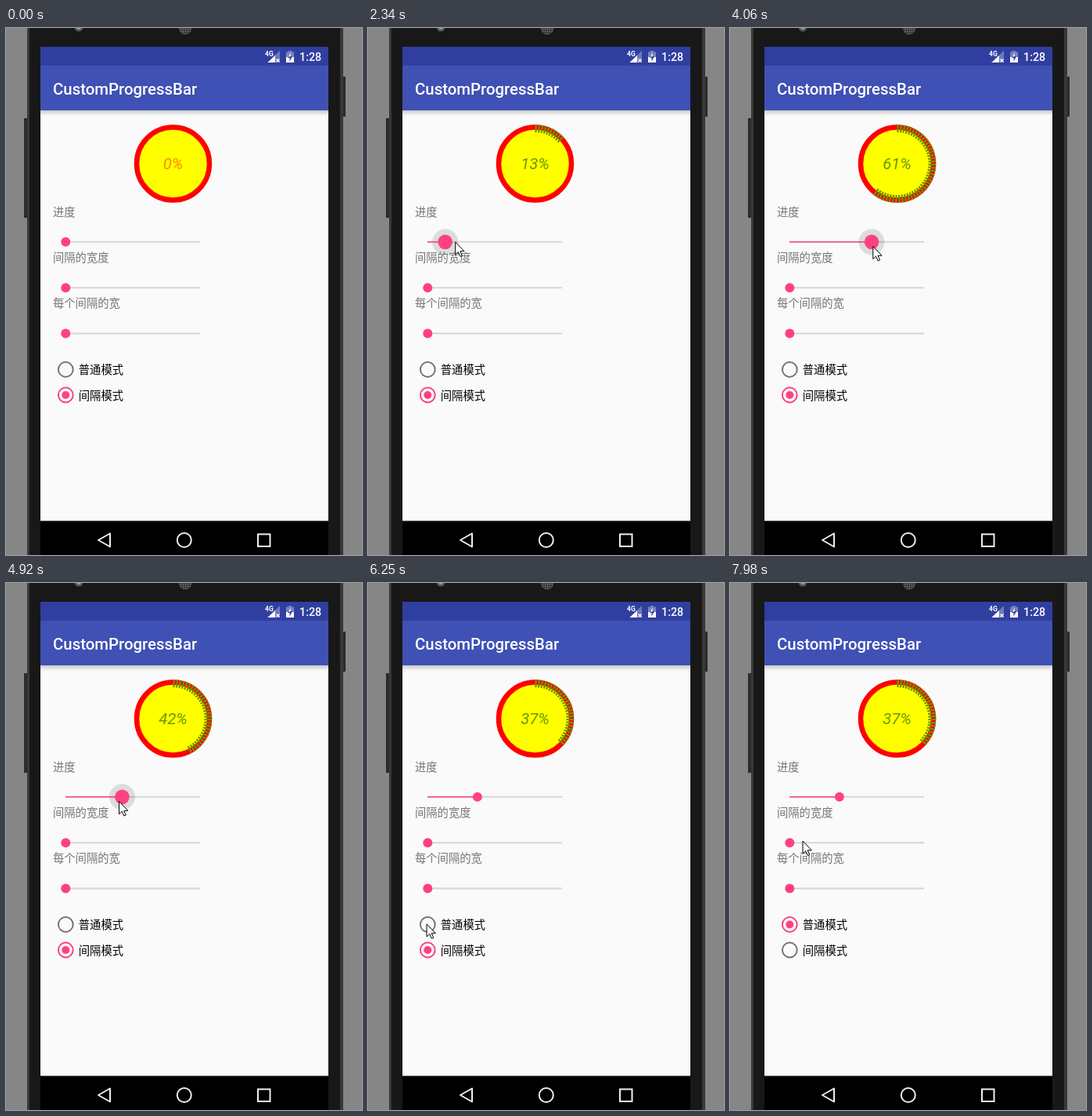
Animation of 455 by 672 pixels, one loop 8 s. Source, as an HTML page:

```html
<!DOCTYPE html>
<html lang="zh-CN">
<head>
<meta charset="utf-8">
<title>CustomProgressBar</title>
<style>
  html, body { margin: 0; width: 100%; height: 100%; overflow: hidden; background: #868686; }
  svg { display: block; width: 455px; height: 672px; }
  text { font-family: Roboto, "Noto Sans CJK SC", "Noto Sans CJK", sans-serif; font-size: 14.3px; }
  .title { font-size: 20.4px; font-weight: 500; fill: #fff; }
  .label { fill: #757575; }
  #percent { font-size: 20.4px; font-style: italic; text-anchor: middle; }
  .track { stroke: #d6d6d6; stroke-width: 2; }
  .pink { fill: #ff4081; }
  .nav { fill: none; stroke: #eee; stroke-width: 2; }
</style>
</head>
<body>
<svg viewBox="0 0 455 672">
  <defs>
    <linearGradient id="shade" x2="0" y2="1">
      <stop stop-color="#000" stop-opacity=".2"/>
      <stop offset="1" stop-color="#000" stop-opacity="0"/>
    </linearGradient>
    <pattern id="mesh" width="3" height="3" patternUnits="userSpaceOnUse">
      <rect width="3" height="3" fill="#333"/><circle cx="1.5" cy="1.5" r=".9" fill="#777"/>
    </pattern>
  </defs>

  <!-- phone body -->
  <rect width="455" height="672" fill="#868686"/>
  <rect x="23" y="115" width="5" height="127" fill="#2b2b2b"/>
  <rect x="429" y="62" width="5" height="51" fill="#2b2b2b"/>
  <rect x="27" width="404" height="672" fill="#383838"/>
  <rect x="30" width="397" height="672" fill="#181818"/>
  <circle cx="93" cy="-1" r="5.5" fill="#555"/>
  <circle cx="93" cy="-1" r="3" fill="#99a"/>
  <circle cx="229" cy="0" r="8.5" fill="url(#mesh)"/>

  <!-- screen -->
  <rect x="44" y="24" width="368" height="605" fill="#fafafa"/>
  <rect x="44" y="24" width="368" height="25" fill="#303f9f"/>
  <rect x="44" y="48" width="368" height="57" fill="#3f51b5"/>
  <rect x="44" y="105" width="368" height="7" fill="url(#shade)"/>
  <rect x="44" y="628.5" width="368" height="44"/>
  <text class="title" x="60" y="85">CustomProgressBar</text>

  <!-- status bar -->
  <g fill="#fff">
    <text x="331" y="35.5" style="font-size:8.5px;font-weight:700">4G</text>
    <path d="M334 44H350V29Z" opacity=".3"/>
    <path d="M334.5 44H344V35Z"/>
    <path d="M345.5 39.5l4 4m0-4l-4 4" stroke="#fff" stroke-width="1.2"/>
    <path d="M358 30.5h3V29h4v1.5h3V44H358Z" opacity=".35"/>
    <path d="M358 37H368V44H358Z"/>
    <path d="M363.7 31L360 38h2.5v4.5L366.2 36h-2.5Z" fill="#303f9f"/>
    <path d="M363.7 31L361 36.5h2.7Z"/>
    <text x="375" y="41.5" style="font-weight:500">1:28</text>
  </g>

  <!-- navigation bar -->
  <path class="nav" d="M118 653L133 644.5V661.5Z" stroke-linejoin="round"/>
  <circle class="nav" cx="227.8" cy="653" r="9"/>
  <rect class="nav" x="322" y="645.5" width="15.5" height="15.5"/>

  <!-- progress dial -->
  <circle cx="213.5" cy="173" r="46.5" fill="#ff0" stroke="#f00" stroke-width="6.5"/>
  <path id="ticks" fill="none" stroke="#690" stroke-width="10"/>
  <text id="percent" x="213.5" y="180"></text>

  <g class="label">
    <text x="60" y="239.5">进度</text>
    <text x="60" y="297.5">间隔的宽度</text>
    <text x="60" y="355.8">每个间隔的宽</text>
  </g>
  <g class="track"><path d="M76 272.8H248"/><path d="M76 331.2H248"/><path d="M76 389.5H248"/></g>
  <circle id="halo" cy="272.8" fill-opacity=".12"/>
  <path id="done" stroke="#ff4081" stroke-width="1.5"/>
  <g class="pink">
    <circle id="thumb" cy="272.8"/>
    <circle cx="76.3" cy="331.2" r="6"/>
    <circle cx="76.3" cy="389.5" r="6"/>
  </g>

  <g id="radios"></g>
  <text x="92.8" y="441">普通模式</text>
  <text x="92.8" y="473.5">间隔模式</text>

  <path id="cursor" d="M0 0V16.2L3.7 12.7L6.3 18.5L8.7 17.5L6.2 11.8H11.3Z" fill="#fff" stroke="#000" stroke-linejoin="round"/>
</svg>
<script>
const LOOP = 8000, STEP = 78;
const GRAB = 1740, PEAK = 4220, TURN = 4300, RELEASE = 5160, SWITCH = 7270;

const $ = id => document.getElementById(id);
const set = (el, attrs) => { for (const k in attrs) el.setAttribute(k, attrs[k]); };
const ramp = (t, from, to) => Math.min(1, Math.max(0, (t - from) / (to - from)));
const ease = u => (1 - Math.cos(Math.PI * u)) / 2;
const mix = (a, b, u) => a + (b - a) * u;

// The drag rises almost steadily, then eases back
function percentAt(t) {
  const u = ramp(t, GRAB, PEAK);
  return Math.round(64 * mix(u, ease(u), .3) - 27 * ease(ramp(t, TURN, RELEASE)));
}
const thumbX = percent => 76.3 + 1.717 * percent;

function dragPoint(t) {
  const lead = mix(17, -5.5, ramp(t, GRAB, RELEASE));
  return {
    x: thumbX(percentAt(t)) + mix(3, lead, ramp(t, GRAB, 2300)),
    y: 272 + 6.5 * ease(ramp(t, GRAB, PEAK))
  };
}

function pointerAt(t) {
  let p = { x: 350, y: 660 };
  const glide = (from, to, x, y, curve = ease) => {
    const u = curve(ramp(t, from, to));
    p = { x: mix(p.x, x, u), y: mix(p.y, y, u) };
  };
  glide(78, 720, 88, 264, u => 1 - (1 - u) ** 2);
  glide(870, 1400, 79, 272);
  if (t >= GRAB) p = dragPoint(Math.min(t, RELEASE));
  glide(RELEASE, 5940, 92, 384);
  glide(5940, 6250, 75, 435);
  glide(SWITCH + 130, 7940, 93, 329);
  return p;
}

function addRadio(y) {
  const make = attrs => {
    const c = document.createElementNS("http://www.w3.org/2000/svg", "circle");
    set(c, { cx: 76.3, cy: y, ...attrs });
    return $("radios").appendChild(c);
  };
  return { ring: make({ r: 9.4, fill: "none", "stroke-width": 2 }), dot: make({ class: "pink" }) };
}
const normal = addRadio(435.5), spaced = addRadio(468);

function setRadio({ ring, dot }, amount) {
  set(ring, { stroke: amount > .3 ? "#ff4081" : "#757575" });
  set(dot, { r: 5 * amount });
}

function tickPath(percent) {
  const radius = 45, spacing = 5, width = 2.8;
  const point = deg => {
    const a = deg * Math.PI / 180;
    return `${213.5 + radius * Math.sin(a)} ${173 - radius * Math.cos(a)}`;
  };
  let d = "";
  for (let a = 0; a < percent * 3.6; a += spacing) d += `M${point(a)}L${point(a + width)}`;
  return d;
}

function draw(time) {
  const t = Math.floor((time + 2) / STEP) * STEP;
  const percent = percentAt(t), x = thumbX(percent), pointer = pointerAt(t);
  const fade = 1 - ramp(t, RELEASE, 5400);
  const picked = ramp(t, SWITCH - 80, SWITCH + 140);

  set($("ticks"), { d: tickPath(percent) });
  set($("percent"), { fill: percent ? "#690" : "#f80" });
  $("percent").textContent = percent + "%";
  set($("done"), { d: `M76 272.8H${x}` });
  set($("thumb"), { cx: x, r: 6 + 3.3 * ramp(t, GRAB - 40, 1900) * fade });
  set($("halo"), { cx: x, r: 16.5 * ramp(t, GRAB, 2260) * fade });
  setRadio(normal, picked);
  setRadio(spaced, 1 - picked);
  set($("cursor"), {
    transform: `translate(${pointer.x} ${pointer.y})`,
    visibility: time < 100 ? "hidden" : "visible"
  });
}

const begin = performance.now();
function frame() {
  draw((performance.now() - begin) % LOOP);
  requestAnimationFrame(frame);
}
frame();
</script>
</body>
</html>
```
